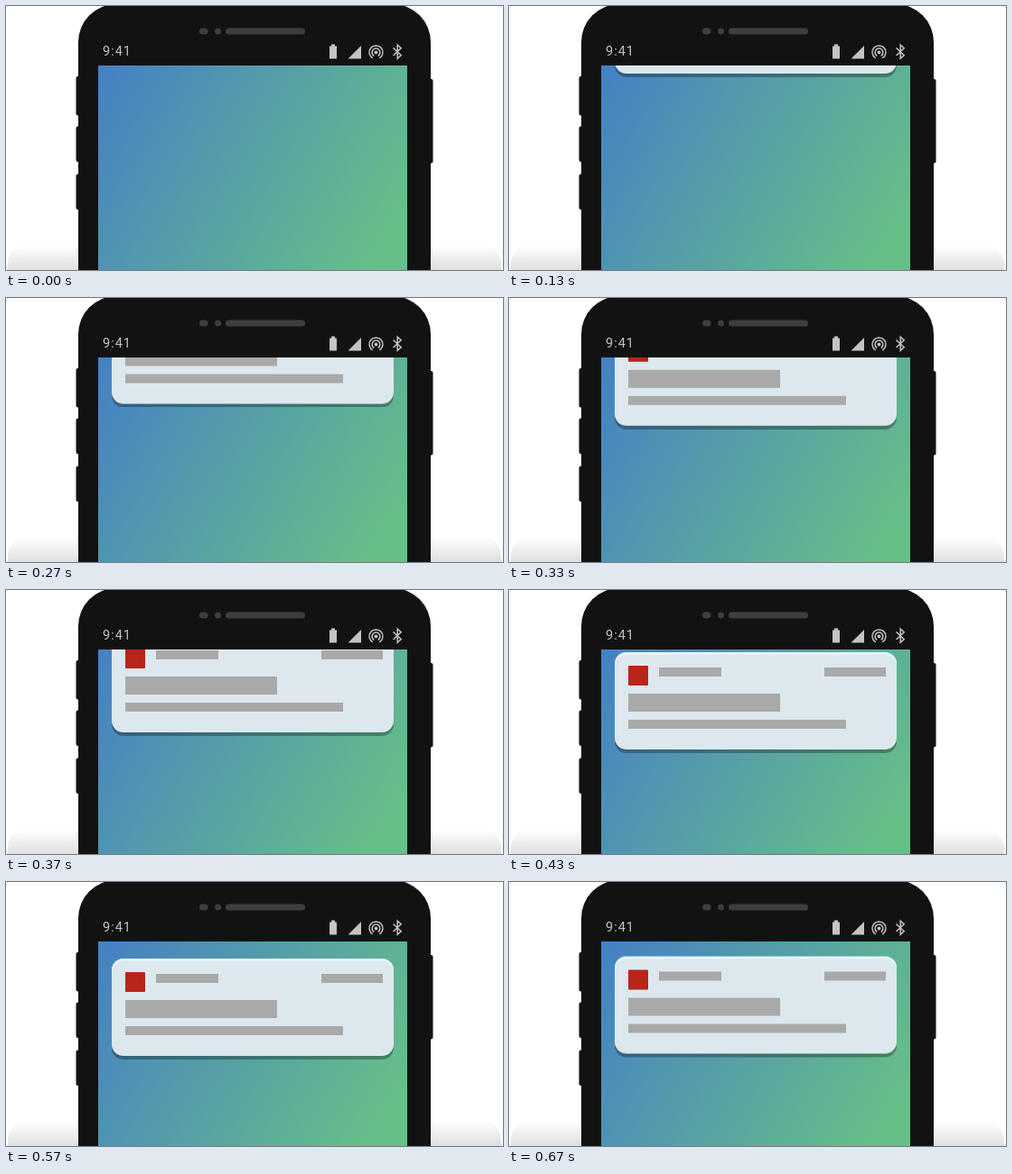
An HTML page that plays this animation: 550x293 px, repeating every 710 ms.

```html
<!DOCTYPE html>
<html lang="en">
<head>
<meta charset="utf-8">
<title>Phone notification</title>
<style>
  html, body { margin: 0; width: 100%; height: 100%; overflow: hidden; background: #fff; }
  .stage { position: relative; width: 550px; height: 293px; overflow: hidden; }
  .stage > * { position: absolute; }
  svg { left: 0; top: 0; }
  .floor {
    left: 2px; top: 266px; width: 546px; height: 60px; border-radius: 20px;
    background: linear-gradient(#fff 0, #dfdfdf 27px);
  }
  .screen {
    left: 101.5px; top: 65.5px; width: 342px; height: 227.5px; overflow: hidden;
    background: linear-gradient(120deg, #4580c5, #66bf87 92%);
  }
  .card {
    position: absolute; left: 15px; top: -65.5px; width: 312px; height: 107.5px;
    border-radius: 13px; background: #dce8ee; will-change: transform;
    box-shadow: inset 0 3px #e6f5fc, 0 4px rgba(0, 0, 0, .3);
  }
  .card i { position: absolute; background: #a9a9a9; height: 10px; }
  .card .app { left: 14.5px; top: 14.5px; width: 22.5px; height: 22px; border-radius: 1px; background: #b92519; }
  .card .name { left: 49px; top: 17px; width: 68.5px; }
  .card .when { left: 231.5px; top: 17px; width: 68.5px; }
  .card .title { left: 14.5px; top: 46px; width: 168.5px; height: 19.5px; }
  .card .body { left: 14.5px; top: 75px; width: 241.5px; }
</style>
</head>
<body>
<div class="stage">
  <div class="floor"></div>
  <svg width="550" height="293" viewBox="0 0 550 293">
    <g fill="#121212">
      <rect x="80" y="-2" width="390" height="360" rx="42"/>
      <rect x="77.5" y="78" width="8" height="43.5" rx="2"/>
      <rect x="77.5" y="133.5" width="8" height="39.5" rx="2"/>
      <rect x="77.5" y="186.500" width="8" height="39.5" rx="2"/>
      <rect x="464" y="81" width="8.500" height="93.5" rx="2"/>
    </g>
    <g fill="#3e3e3e">
      <rect x="214" y="24.500" width="9.500" height="7" rx="3.5"/>
      <circle cx="234.500" cy="28" r="3.500"/>
      <rect x="243" y="24.500" width="88" height="7" rx="3.5"/>
    </g>
    <g fill="#c4c4c4">
      <text x="107" y="55" font-family="Roboto, sans-serif" font-size="14.5" letter-spacing="1">9:41</text>
      <path d="M360 42.500h4v2h1.500q.5 0 .5.5v13q0 .5-.5.5h-7q-.5 0-.5-.5v-13q0-.5.5-.5h1.500zM378.500 58.500h14.500v-14.500z"/>
      <circle cx="409.500" cy="51.500" r="1.900"/>
    </g>
    <g fill="none" stroke="#c4c4c4" stroke-width="1.500">
      <path d="M405.700 57.900A7.500 7.500 0 1 1 413.300 57.900"/>
      <path d="M407.300 55.300A4.400 4.400 0 1 1 411.700 55.300"/>
      <path d="M428.500 46.500L437.200 54.700L433.200 58.300V43.200L437.200 46.800L428.500 55"/>
    </g>
  </svg>
  <div class="screen">
    <div class="card" id="card">
      <i class="app"></i><i class="name"></i><i class="when"></i><i class="title"></i><i class="body"></i>
    </div>
  </div>
</div>
<script>
  const LOOP = 710;
  const FRAME = 100 / 3;
  // [time in ms, top edge of the card]
  const path = [[0, -49], [70, -44.5], [130, -33], [270, 9.5], [370, 50],
                [430, 69], [500, 80.5], [550, 84.8], [600, 84.3], [670, 82.5], [710, 82.5]];
  const card = document.getElementById('card');

  function slope(i) {
    const a = path[Math.max(i - 1, 0)];
    const b = path[Math.min(i + 1, path.length - 1)];
    return (b[1] - a[1]) / (b[0] - a[0]);
  }

  // Cubic Hermite curve through the points
  function cardTop(t) {
    let i = 0;
    while (i < path.length - 2 && t >= path[i + 1][0]) i++;
    const [t0, y0] = path[i], [t1, y1] = path[i + 1];
    const d = t1 - t0, u = (t - t0) / d, v = 1 - u;
    return v * v * ((1 + 2 * u) * y0 + u * d * slope(i))
         + u * u * ((1 + 2 * v) * y1 - v * d * slope(i + 1));
  }

  // Thirty steps a second, on ten-millisecond marks
  function stepTime(t) {
    const mark = n => Math.round(n * FRAME / 10) * 10;
    let n = Math.floor(t / FRAME) + 1;
    while (mark(n) > t) n--;
    return mark(n);
  }

  function draw() {
    const t = stepTime(performance.now() % LOOP);
    const y = t < 70 ? -120 : cardTop(t);
    card.style.transform = `translateY(${y.toFixed(2)}px)`;
    requestAnimationFrame(draw);
  }
  draw();
</script>
</body>
</html>
```
